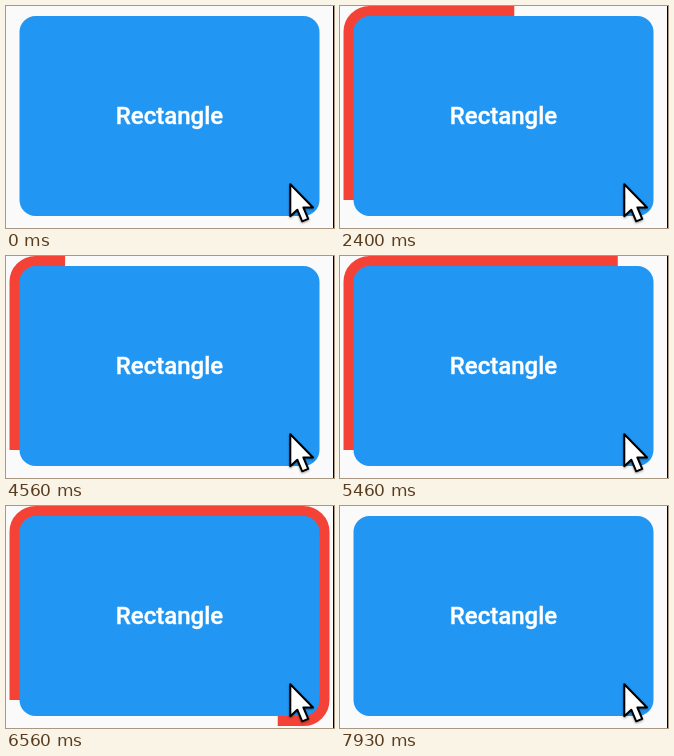
An HTML page that plays this animation: 328x222 px, repeating every 7.96 s.

```html
<!DOCTYPE html>
<html lang="en">
<head>
<meta charset="utf-8">
<title>Rectangle border</title>
<style>
  html, body { margin: 0; width: 100%; height: 100%; overflow: hidden; background: #fafafa; }
  svg { display: block; }
  text { font: 500 24px Roboto, sans-serif; fill: #fff; text-anchor: middle; }
</style>
</head>
<body>
<svg width="328" height="222" viewBox="0 0 328 222">
  <defs>
    <path id="card" pathLength="1" d="M13.5 194V26a16 16 0 0 1 16-16H297.5a16 16 0 0 1 16 16V194a16 16 0 0 1-16 16H29.5a16 16 0 0 1-16-16"/>
  </defs>
  <use id="border" href="#card" fill="none" stroke="#f44336" stroke-width="20"/>
  <use href="#card" fill="#2196f3"/>
  <text x="163.5" y="118" stroke="#fff" stroke-width=".4">Rectangle</text>
  <path d="M284.3 178.3V210.3L291.3 203.7L296.2 215.3L302.2 212.8L297.4 201.5H307Z"
        fill="#fff" stroke="#000" stroke-width="2" stroke-linejoin="round"
        style="filter: drop-shadow(0 1px 1px #0006)"/>
  <rect x="327" width="1" height="222"/>
</svg>
<script>
const LOOP = 7960, FPS = 30;
const border = document.getElementById('border');

// Each press grows the border through [time, fraction] points and clears it on release.
const presses = [
  { from: 1060, to: 2730, points: [[1010, 0], [5010, 1]] },
  { from: 3660, to: 7930, points: [[3644, 0], [5460, .454], [6030, .5926], [7660, 1]] },
];

// Time on a 30 fps clock, rounded down to hundredths of a second.
function snap(t) {
  const step = Math.floor((Math.floor(t / 10) * 10 + 9) * FPS / 1000);
  return Math.floor(step * 100 / FPS) * 10;
}

function interpolate(points, t) {
  const i = points.findIndex(([time]) => time > t);
  if (i < 0) return points.at(-1)[1];
  const [[t0, v0], [t1, v1]] = points.slice(i - 1, i + 1);
  return v0 + (v1 - v0) * (t - t0) / (t1 - t0);
}

function draw(now) {
  const t = snap(now % LOOP);
  const press = presses.find(({ from, to }) => t >= from && t < to);
  border.style.visibility = press ? 'visible' : 'hidden';
  if (press) border.setAttribute('stroke-dasharray', `${interpolate(press.points, t)} 2`);
}

const start = performance.now();
function tick() {
  draw(performance.now() - start);
  requestAnimationFrame(tick);
}
tick();
</script>
</body>
</html>
```
